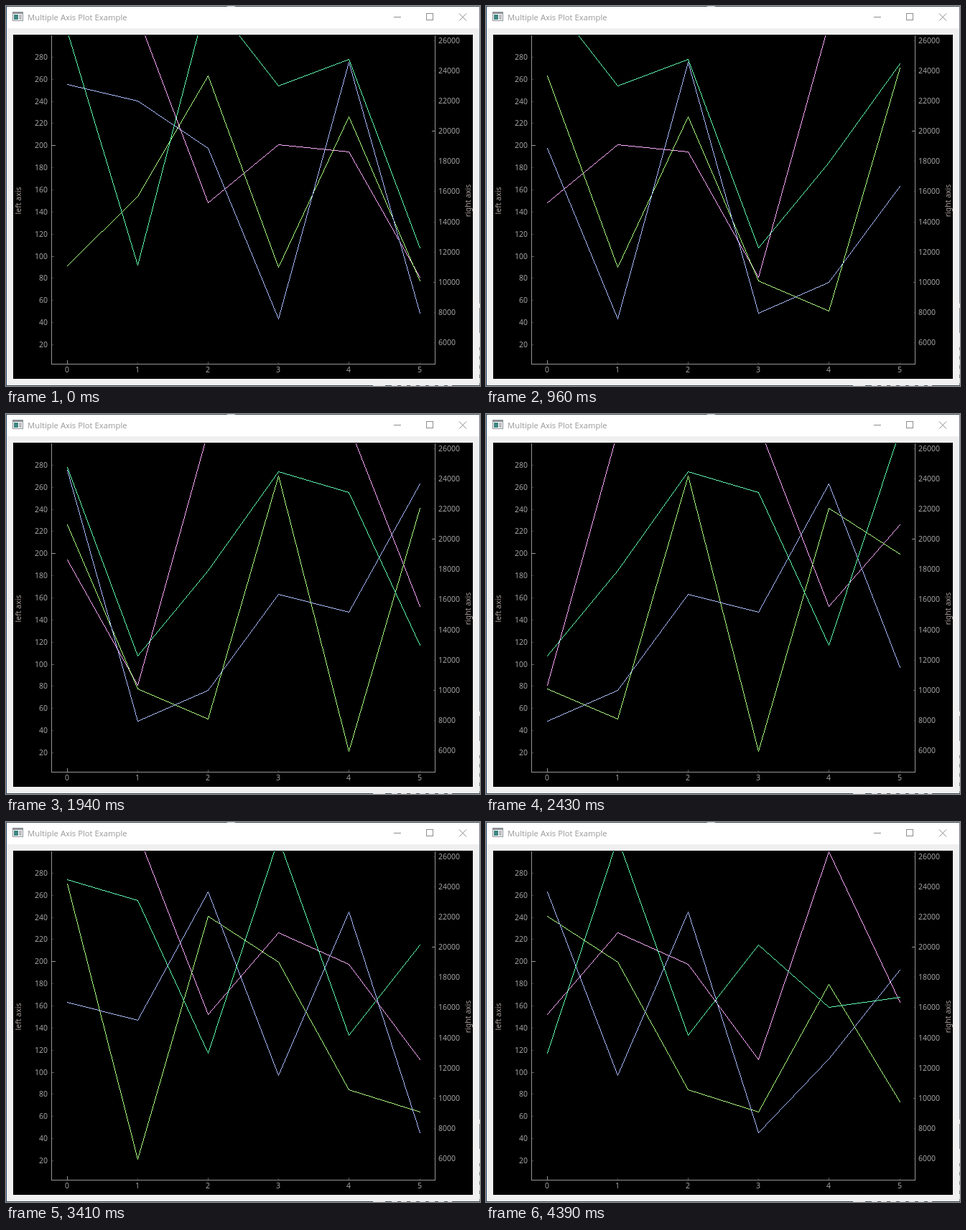
An HTML page with a canvas for the animation above (4700 ms loop, 660x530 px).

```html
<!DOCTYPE html>
<html lang="en">
<head>
<meta charset="utf-8">
<title>Multiple Axis Plot Example</title>
<style>
  html, body { margin: 0; width: 100%; height: 100%; overflow: hidden; background: #f0f0f0; }
  svg, canvas { position: absolute; left: 0; top: 0; display: block; }
  .title { font: 11.3px "Open Sans", "Noto Sans", sans-serif; fill: #999; }
  .axis { font: 10.5px "Noto Sans", "Open Sans", sans-serif; fill: #a4a4a4; }
  .name { fill: #aaa09c; text-anchor: middle; }
  .button { fill: none; stroke: #8c8c8c; }
</style>
</head>
<body>
<svg id="stage" width="660" height="530" viewBox="0 0 660 530">
  <rect width="660" height="530" fill="#f0f0f0"/>
  <rect width="660" height="31" fill="#fff"/>
  <g shape-rendering="crispEdges">
    <rect width="660" height="1" fill="#3c4854"/>
    <rect x="308" width="11" height="1" fill="#b4b8bc"/>
    <rect width="1" height="530" fill="#24466a"/>
    <rect x="659" width="1" height="530" fill="#7c8288"/>
    <rect y="529" width="660" height="1" fill="#3c4854"/>
    <path d="M511 529.5h17M659.5 415v6M659.5 456v20" stroke="#e4e6e8"/>
    <path d="M537 529.5h84M659.5 480v46" stroke="#d4d8dc" stroke-dasharray="8 5"/>
    <rect x="10" y="40" width="640" height="480" fill="#000"/>
    <!-- window icon -->
    <rect x="9" y="8" width="15" height="13" fill="#8c9296"/>
    <rect x="10" y="11" width="13" height="9" fill="#fff"/>
    <rect x="11" y="12" width="6" height="7" fill="#3f8580"/>
    <rect x="18" y="12" width="4" height="7" fill="#b9bec0"/>
  </g>
  <text class="title" x="30" y="20">Multiple Axis Plot Example</text>
  <g class="button">
    <path d="M540 15.5h10M585.5 10.5h9v9h-9z" shape-rendering="crispEdges"/>
    <path d="M631 10.5l10 10M641 10.5l-10 10"/>
  </g>
  <g id="axes" class="axis">
    <path d="M63.5 41V499.5H597.5V41" fill="none" stroke="#969696" shape-rendering="crispEdges"/>
    <text class="name" transform="translate(20.5 271.5) rotate(-90)">left axis</text>
    <text class="name" transform="translate(646.5 271.5) rotate(-90)">right axis</text>
  </g>
</svg>
<canvas id="plot" width="660" height="530"></canvas>
<script>
const axes = document.getElementById('axes');

function add(tag, attrs, text) {
  const el = document.createElementNS('http://www.w3.org/2000/svg', tag);
  for (const key in attrs) el.setAttribute(key, attrs[key]);
  if (text !== undefined) el.textContent = text;
  axes.append(el);
}

function label(text, x, y, anchor) {
  add('text', { x, y, 'text-anchor': anchor }, text);
}

// Ticks point into the plot; level 0 is the longest and brightest.
function tick(x, y, dx, dy, level) {
  const len = [5, 3, 2][level];
  add('rect', {
    x: dx < 0 ? x - len : x, y: dy < 0 ? y - len : y,
    width: dx ? len : 1, height: dy ? len : 1,
    fill: '#969696', opacity: [1, .6, .4][level], 'shape-rendering': 'crispEdges'
  });
}

const levelOf = (v, major, mid) => v % major === 0 ? 0 : v % mid === 0 ? 1 : 2;
const xAt = i => Math.round(85 + i * 98.1);

for (let v = 20; v <= 280; v += 20) {
  const y = Math.round(502.7 - v * 1.542);
  label(v, 58, y + 4, 'end');
  tick(64, y, 1, 0, levelOf(v, 200, 100));
}
for (let v = 6000; v <= 26000; v += 2000) {
  const y = Math.round(595.3 - v * .02105);
  label(v, 602, y + 4, 'start');
  tick(598, y, -1, 0, levelOf(v, 20000, 10000));
}
for (let v = 0; v <= 5; v++) {
  label(v, xAt(v), 511, 'middle');
  tick(xAt(v), 499, 0, -1, levelOf(v, 10, 2));
}

// Heights in pixels; the view shows six neighbours at a time.
const series = [
  ['#ffaaff', [0, 14, 274, 193, 203, 378, 24, 10, 16, 268, 154, 198, 331, 41, 251]],
  ['#aaff7f', [362, 265, 97, 364, 154, 383, 425, 86, 470, 131, 195, 373, 404, 226, 390]],
  ['#aabbff', [109, 132, 198, 436, 78, 428, 385, 251, 276, 97, 353, 125, 433, 330, 206]],
  ['#5fffaf', [35, 361, -15, 111, 74, 337, 218, 80, 109, 322, 23, 297, 171, 258, 244]]
];

const ctx = document.getElementById('plot').getContext('2d');
ctx.beginPath();
ctx.rect(64, 41, 533, 458);
ctx.clip();

// One-pixel line without smoothing
function line(x0, y0, x1, y1) {
  const n = Math.max(Math.abs(x1 - x0), Math.abs(y1 - y0));
  for (let i = 0; i <= n; i++) {
    ctx.fillRect(Math.round(x0 + (x1 - x0) * i / n), Math.round(y0 + (y1 - y0) * i / n), 1, 1);
  }
}

function draw(step) {
  ctx.clearRect(0, 0, 660, 530);
  for (const [color, ys] of series) {
    ctx.fillStyle = color;
    for (let i = 0; i < 5; i++) line(xAt(i), ys[step + i], xAt(i + 1), ys[step + i + 1]);
  }
}

const LOOP = 4700, FIRST = 470, STEP = 490;
const start = performance.now();
let shown = -1;

function frame() {
  const t = (performance.now() - start) % LOOP;
  const step = t < FIRST ? 0 : 1 + Math.floor((t - FIRST) / STEP);
  if (step !== shown) draw(shown = step);
  requestAnimationFrame(frame);
}
frame();
</script>
</body>
</html>
```
